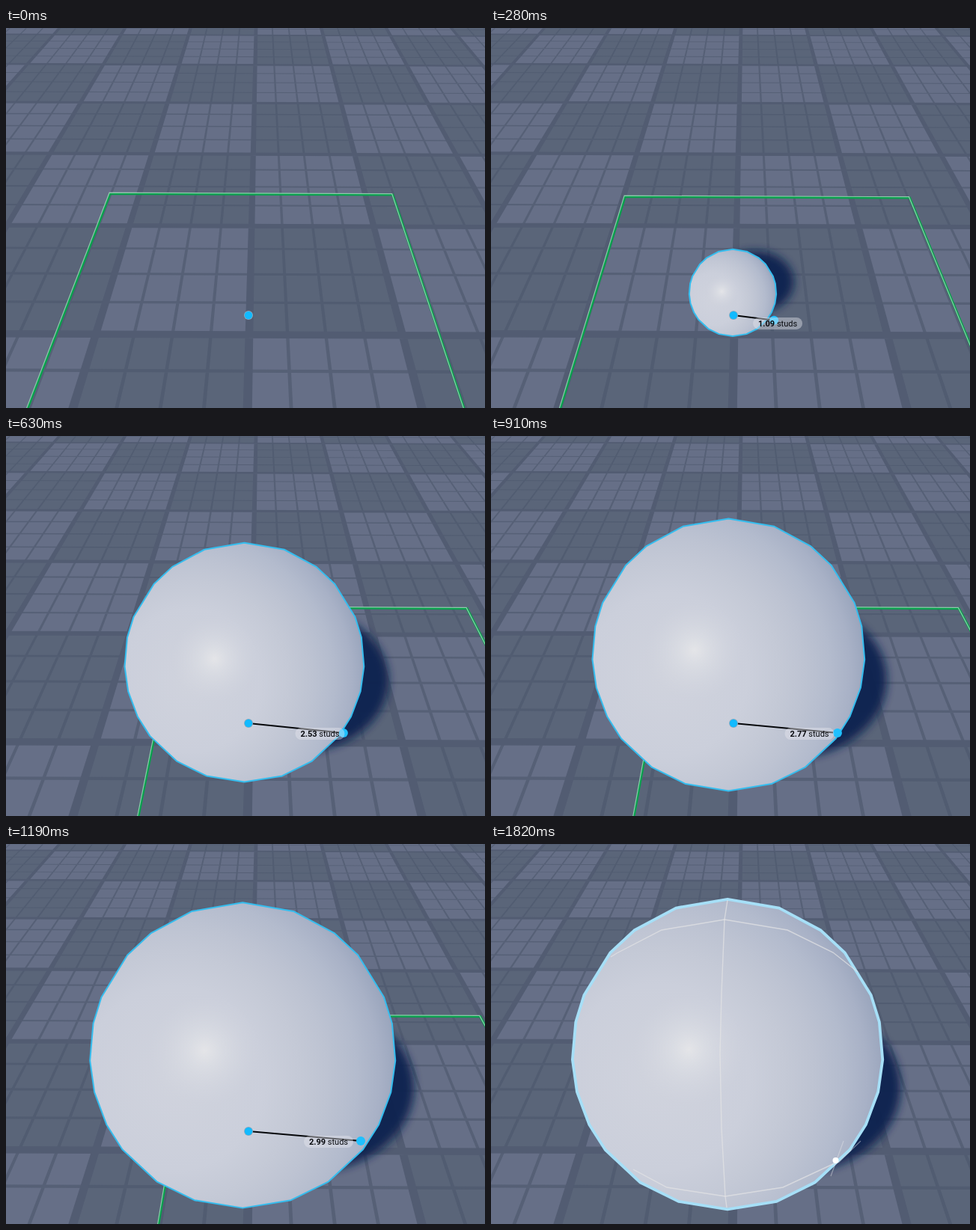
Recreate the animation shown at these times as an HTML page. Size 640x508 px, loop 1.89 s.

```html
<!DOCTYPE html>
<html lang="en">
<head>
<meta charset="utf-8">
<title>Drawing a sphere</title>
<style>
  html, body { margin: 0; width: 100%; height: 100%; overflow: hidden; background: #5a6478; }
  svg { display: block; width: 640px; height: 508px; }
  text { font: 11px Roboto, "Liberation Sans", sans-serif; fill: #080a0e; }
  tspan { font-weight: 700; }
  path, line { fill: none; }
</style>
</head>
<body>
<svg viewBox="0 0 640 508">
  <defs>
    <radialGradient id="shade" gradientUnits="userSpaceOnUse" cx="-.45" cy=".15" r="1.5">
      <stop offset="0" stop-color="#d0d3dd"/>
      <stop offset=".4" stop-color="#cbcfdb"/>
      <stop offset=".55" stop-color="#c4c9d6"/>
      <stop offset=".67" stop-color="#bdc3d2"/>
      <stop offset=".8" stop-color="#b3bbcd"/>
      <stop offset=".9" stop-color="#a8b1c6"/>
      <stop offset="1" stop-color="#96a2ba"/>
    </radialGradient>
    <radialGradient id="glow" gradientUnits="userSpaceOnUse" cx="-.25" cy="-.03" r=".36">
      <stop offset="0" stop-color="#e8e8ea" stop-opacity=".85"/>
      <stop offset=".3" stop-color="#e2e4e8" stop-opacity=".55"/>
      <stop offset="1" stop-color="#d4d7e0" stop-opacity="0"/>
    </radialGradient>
    <filter id="blur" filterUnits="userSpaceOnUse" x="0" y="0" width="640" height="508">
      <feGaussianBlur stdDeviation="6"/>
    </filter>
  </defs>

  <g id="floor"></g>
  <ellipse id="shadow" fill="#0d2250" opacity=".95" filter="url(#blur)"/>

  <g id="plane">
    <path id="planeLine" stroke="#0b9f4e" stroke-width="3.2"/>
    <path id="planeEdge" stroke="#b4dcc8" stroke-width="1.2" stroke-opacity=".75" transform="translate(-1 -1.3)"/>
  </g>

  <g id="ball">
    <polygon id="body" fill="url(#shade)"/>
    <circle cx="-.25" cy="-.03" r=".36" fill="url(#glow)"/>
    <polygon id="rim" fill="none" stroke-linejoin="round" vector-effect="non-scaling-stroke"/>
  </g>

  <g id="gizmo">
    <line id="radius" stroke="#05070a" stroke-width="2"/>
    <circle r="6" fill="#8fa9bd"/>
    <circle r="5.2" fill="#12baff"/>
    <circle id="handle" r="6" fill="#1fc0ff"/>
    <g id="label">
      <rect x="-33" y="-8" width="66" height="16" rx="8" fill="#e6e8ee" fill-opacity=".42"/>
      <text text-anchor="middle" y="4"><tspan id="amount"></tspan> studs</text>
    </g>
  </g>

  <g id="hover" stroke="#e4e4e6" stroke-opacity=".7" stroke-width="1.4">
    <path d="M316 75L312 101L308 200L306 280L308 380L313 471L315 486"/>
    <path d="M160 151L168 146L228 115L312 101L396 115L457 145L490 171"/>
    <path d="M190 435L235 459L313 471L390 459L461 426"/>
    <path d="M454 444L471 397M464 426L494 397" stroke-opacity=".45" stroke-width="1.2"/>
    <circle cx="460.500" cy="423" r="4" fill="#fff" stroke="none"/>
  </g>
</svg>

<script>
const LOOP = 1890, STEP = 70, RELEASE = 1750;
const HORIZON = -304, VANISH_X = 340.8, TILE = 0.287;
const ORIGIN = { x: 324, y: 384 };
const HALF_PLANE = 1.25;

// Drag progress: time in ms, radius in studs.
const DRAG = [
  [0, 0], [70, 0.06], [210, 0.59], [420, 2.09], [560, 2.31],
  [630, 2.53], [910, 2.77], [1120, 2.96], [1190, 2.99], [1540, 3.02], [LOOP, 3.02]
];

// Silhouette corners of half the low-poly sphere, in degrees from the top.
const CORNERS = [0, 19.4, 37, 49, 67.6, 78, 92, 104, 117, 128, 145.8, 161.6, 180];

const el = id => document.getElementById(id);
const set = (node, attrs) => {
  for (const key in attrs) node.setAttribute(key, attrs[key]);
};
const show = (node, visible) => { node.style.display = visible ? "" : "none"; };

// Floor coordinates, in tiles, to the screen.
function project(u, v) {
  const depth = 1 / (0.0014006 + 0.0003575 * v);
  const x = VANISH_X + (TILE * u - 0.0222) * depth;
  return [x, HORIZON + depth + 0.004 * (x - ORIGIN.x)];
}

// Screen to floor coordinates.
function unproject(x, y) {
  const depth = y - 0.004 * (x - ORIGIN.x) - HORIZON;
  return [((x - VANISH_X) / depth + 0.0222) / TILE, (1 / depth - 0.0014006) / 0.0003575];
}

const toPath = points => "M" + points.map(p => p.map(n => n.toFixed(2)).join(" ")).join("L");
const quad = (u0, v0, u1, v1) =>
  toPath([project(u0, v0), project(u1, v0), project(u1, v1), project(u0, v1)]) + "Z";

function buildFloor() {
  const [left, right, near, far] = [-6, 6, -1, 7];
  let light = "", thin = "", thick = "";
  for (let u = left; u < right; u++)
    for (let v = near; v < far; v++)
      if ((u + v) & 1) light += quad(u, v, u + 1, v + 1);

  const addLine = (i, across) => {
    const major = i % 4 === 0, at = i / 4, w = major ? 0.026 : 0.0105;
    const d = across ? quad(left, at - w, right, at + w) : quad(at - w, near, at + w, far);
    if (major) thick += d; else thin += d;
  };
  for (let i = left * 4; i <= right * 4; i++) addLine(i, false);
  for (let i = near * 4; i <= far * 4; i++) addLine(i, true);

  const layer = (d, fill, opacity = 1) => `<path d="${d}" style="fill:${fill};fill-opacity:${opacity}"/>`;
  el("floor").innerHTML =
    '<rect width="640" height="508" fill="#5a6579"/>' +
    layer(light, "#666f87") + layer(thin, "#4d576d", 0.62) + layer(thick, "#525c72");
}

function buildBall() {
  const mirrored = CORNERS.slice(1, -1).reverse().map(a => 360 - a);
  const points = [...CORNERS, ...mirrored].map(a => {
    const t = a * Math.PI / 180;
    return `${Math.sin(t).toFixed(4)},${(-Math.cos(t)).toFixed(4)}`;
  }).join(" ");
  set(el("body"), { points });
  set(el("rim"), { points });
}

function radiusAt(t) {
  const i = DRAG.findIndex(([time]) => time > t);
  const [t0, r0] = DRAG[i - 1], [t1, r1] = DRAG[i];
  return r0 + (r1 - r0) * (t - t0) / (t1 - t0);
}

function drawPlane(u, v) {
  const h = HALF_PLANE, near = -1.05;
  const d = toPath([
    project(u - h, near), project(u - h, v + h), project(u + h, v + h), project(u + h, near)
  ]);
  set(el("planeLine"), { d });
  set(el("planeEdge"), { d });
}

function drawBall(R, released) {
  const x = ORIGIN.x - 0.87 * R * R;
  const y = ORIGIN.y - R / (0.0401 - 0.00356 * R);
  const size = R / (0.0202 - 0.00105 * R - 0.00027 * R * R);
  set(el("ball"), { transform: `translate(${x} ${y}) scale(${size})` });
  set(el("rim"), {
    stroke: released ? "#a6dff7" : "#35bdee",
    "stroke-width": released ? 3.8 : 2
  });
  set(el("shadow"), {
    cx: ORIGIN.x + 26 * R,
    cy: ORIGIN.y - 60 * (1 - Math.exp(-R / 0.8)),
    rx: 48 * R,
    ry: 38 * R
  });
}

function drawGizmo(R, x, y) {
  set(el("radius"), { x1: ORIGIN.x, y1: ORIGIN.y, x2: x, y2: y });
  set(el("handle"), { cx: x, cy: y });
  set(el("label"), {
    transform: `translate(${(ORIGIN.x + x) / 2 + 32} ${(ORIGIN.y + y) / 2 + 7.5})`
  });
  el("amount").textContent = R.toFixed(2);
}

function render(time) {
  const t = Math.floor((time % LOOP) / STEP) * STEP;
  const R = radiusAt(t), released = t >= RELEASE, started = R > 0;

  const handleY = ORIGIN.y + 13 * Math.min(1, R / 2.09);
  const depth = handleY - HORIZON;
  const handleX = VANISH_X + (TILE * (R / 4 - 0.008) - 0.0222) * depth;

  drawPlane(...unproject(handleX, handleY));
  drawBall(R, released);
  drawGizmo(R, handleX, handleY);

  for (const id of ["ball", "shadow", "radius", "handle", "label"]) show(el(id), started);
  show(el("plane"), !released);
  show(el("gizmo"), !released);
  show(el("hover"), released);
}

buildFloor();
buildBall();
for (const dot of document.querySelectorAll("#gizmo > circle:not(#handle)"))
  set(dot, { cx: ORIGIN.x, cy: ORIGIN.y });

const start = performance.now();
function tick() {
  render(performance.now() - start);
  requestAnimationFrame(tick);
}
tick();
</script>
</body>
</html>
```
